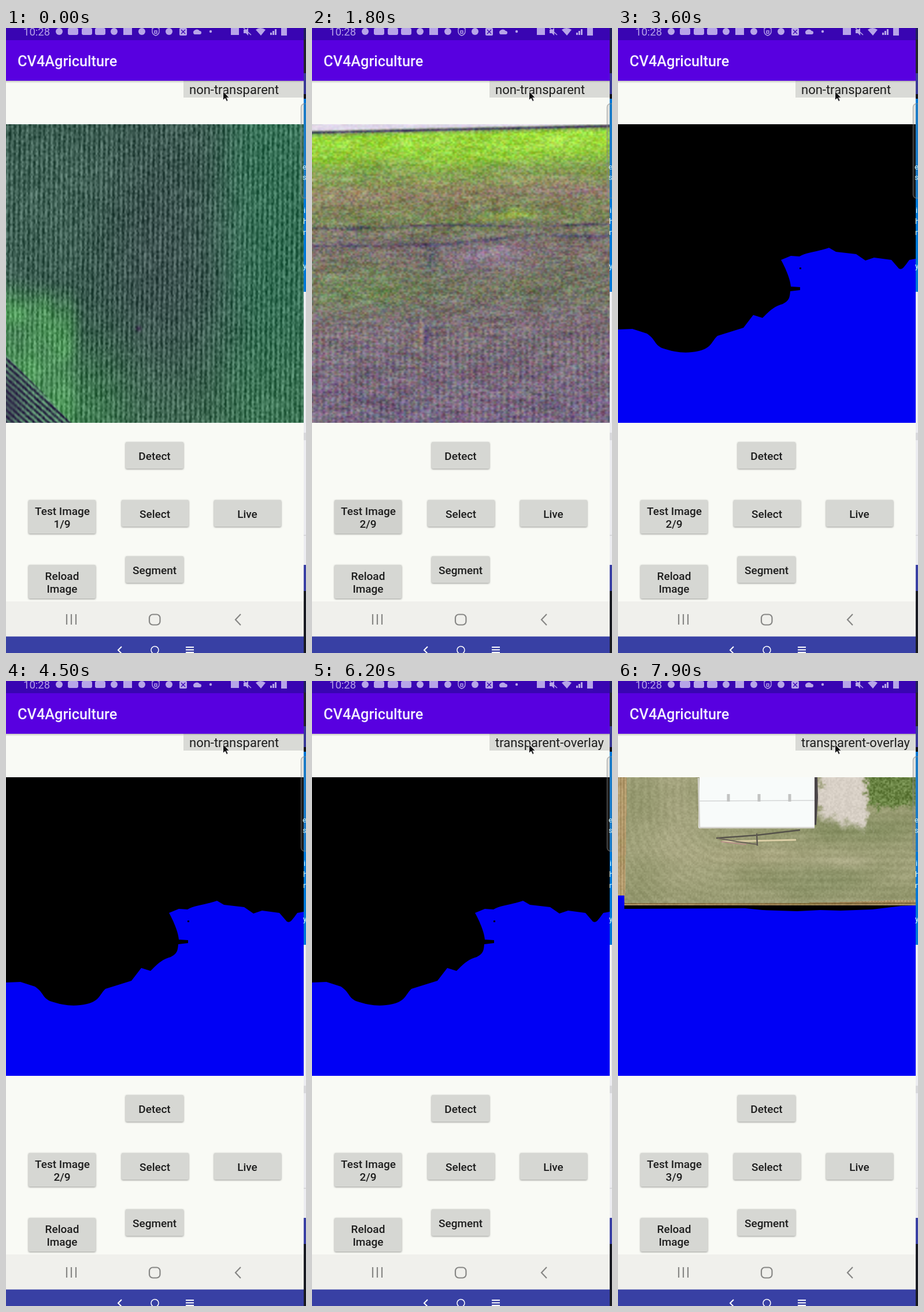
Recreate the animation shown at these times as an HTML page with a canvas. Size 519 px wide and 1078 px high, loop 8 s.

```html
<!DOCTYPE html>
<html lang="en">
<head>
<meta charset="utf-8">
<title>Field segmentation demo</title>
<style>
html, body { margin: 0; width: 519px; height: 1078px; overflow: hidden; background: #f9faf5; }
canvas, svg { position: absolute; left: 0; top: 0; }
canvas { top: 166px; }
text { font-family: Roboto, sans-serif; fill: #1d1d1d; }
.btn text { font-size: 19px; font-weight: 500; text-anchor: middle; }
.btn rect { fill: #d6d7d3; filter: drop-shadow(0 1px 1.5px #0006); }
.spin { font-size: 22px; }
.strip { font-size: 13px; fill: #dff; }
.nav { fill: none; stroke: #878785; stroke-width: 2.2; }
.sysnav { fill: none; stroke: #fff; stroke-width: 2; }

.step { animation: 8s step-end infinite; }
#mask1 { animation-name: mask1; }
#field2 { animation-name: field2; }
#mask2 { animation-name: mask2; }
#field3, .three { animation-name: field3; }
#mask3 { animation-name: mask3; }
.one { animation-name: one; }
.two { animation-name: two; }
.solid { animation-name: solid; }
.overlay { animation-name: overlay; }
@keyframes mask1 { 0% { opacity: 0 } 7.5%, 100% { opacity: 1 } }
@keyframes field2 { 0% { opacity: 0 } 18.75%, 100% { opacity: 1 } }
@keyframes mask2 { 0% { opacity: 0 } 26.25%, 100% { opacity: 1 } }
@keyframes field3 { 0% { opacity: 0 } 82.5%, 100% { opacity: 1 } }
@keyframes mask3 { 0% { opacity: 0 } 91.25%, 100% { opacity: 1 } }
@keyframes one { 0% { opacity: 1 } 18.75%, 100% { opacity: 0 } }
@keyframes two { 0% { opacity: 0 } 18.75% { opacity: 1 } 82.5%, 100% { opacity: 0 } }
@keyframes solid { 0% { opacity: 1 } 66.25%, 100% { opacity: 0 } }
@keyframes overlay { 0% { opacity: 0 } 66.25%, 100% { opacity: 1 } }

#press { opacity: 0; animation: press 8s linear infinite; }
@keyframes press {
  0%, 6.2% { opacity: 0 } 7.5%, 9.5% { opacity: .126 } 14%, 25% { opacity: 0 }
  26.25%, 28% { opacity: .126 } 33%, 89.5% { opacity: 0 }
  91%, 92.5% { opacity: .126 } 97%, 100% { opacity: 0 }
}
#ripple { opacity: 0; animation: ripple 8s linear infinite; }
@keyframes ripple {
  0%, 18% { opacity: 0; r: 30px } 18.75% { opacity: .11; r: 40px } 20% { opacity: .11; r: 110px }
  23.5% { opacity: 0; r: 110px } 23.6%, 82.4% { opacity: 0; r: 30px }
  82.5% { opacity: .11; r: 32px } 83.75% { opacity: .11; r: 40px } 85% { opacity: .09; r: 110px }
  87% { opacity: 0; r: 110px } 100% { opacity: 0; r: 30px }
}
</style>
</head>
<body>
<canvas id="field1" width="515" height="515"></canvas>
<svg id="mask1" class="step" width="519" height="1078">
  <path d="M0 166H515V681H0Z"/>
  <path fill="#750075" d="M0 419C10 418 20 420 29 423L54 436C75 439 92 441 106 453C118 463 123 478 123 500C124 530 127 553 137 571L153 560L167 569C178 574 188 570 190 582C195 595 195 605 200 613C210 635 220 658 222 681H0Z"/>
</svg>
<canvas id="field2" class="step" width="515" height="515"></canvas>
<svg id="mask2" class="step" width="519" height="1078">
  <path d="M0 166H515V681H0Z"/>
  <path fill="#0000f5" d="M0 520L25 519L50 527C66 538 62 545 76 552C100 560 118 562 140 557C162 552 162 540 172 531L217 517L234 495L250 500C262 488 270 480 285 476C297 470 297 464 298 454L315 452V447L299 446C298 430 285 405 282 400L299 393L314 394C325 387 345 386 365 379L377 386L412 390L428 401L443 396L473 400L486 415C492 418 495 412 504 400L515 398V681H0Z"/>
  <path d="M314 413h3v3h-3z"/>
</svg>
<canvas id="field3" class="step" width="515" height="515"></canvas>
<svg id="mask3" class="step" width="519" height="1078">
  <path d="M11 387H515V400H11Z"/>
  <path fill="#0000f5" d="M0 370H11V393L220 392L250 395L310 397L350 395L385 396L440 394L490 388L515 387V681H0Z"/>
</svg>

<svg width="519" height="1078">
  <defs>
    <linearGradient id="shade" x2="0" y2="1">
      <stop stop-opacity=".22"/><stop offset="1" stop-opacity="0"/>
    </linearGradient>
    <clipPath id="testClip"><rect x="39" y="814" width="116" height="58" rx="2"/></clipPath>
  </defs>

  <!-- window behind, at the right edge -->
  <path fill="#20205a" d="M515 0h4v20h-4z"/>
  <path fill="#24242c" d="M515 20h4v58h-4z"/>
  <path fill="#3a3a98" d="M515 78h4v36h-4z"/>
  <path fill="#15151c" d="M515 114h4v8h-4z"/>
  <path fill="#0078d7" d="M515 122h4v333h-4z"/>
  <path fill="#ececf0" d="M515 455h4v471h-4z"/>
  <path fill="#d8d8dc" d="M515 698h4v13h-4zM515 874h4v2h-4z"/>
  <path fill="#3a40a4" d="M515 926h4v45h-4z"/>
  <path fill="#191b22" d="M515 971h4v107h-4z"/>
  <text class="strip" x="513" y="244">e</text><text class="strip" x="513" y="262">s</text>
  <text class="strip" x="515" y="319">i</text><text class="strip" x="514" y="338">h</text>
  <text class="strip" x="514" y="357">n</text><text class="strip" x="514" y="415">y</text>
  <rect x="510.5" y="130.5" width="20" height="163" rx="6" fill="#8883" stroke="#8889" stroke-width="1.4"/>

  <!-- status and title bars -->
  <path fill="#3905b2" d="M0 0h515v21H0z"/>
  <path fill="#5800e0" d="M0 21h515v70H0z"/>
  <path fill="url(#shade)" d="M0 91h515v4H0z"/>
  <g fill="#b7a5e8">
    <text x="30" y="13" font-size="18.5" style="fill:#b7a5e8">10:28</text>
    <circle cx="92" cy="6" r="6"/>
    <rect x="107" y="0" width="18" height="12" rx="3"/>
    <rect x="131" y="0" width="18" height="12" rx="3"/>
    <rect x="154" y="0" width="18" height="12" rx="3"/>
    <circle cx="187" cy="6" r="6"/>
    <rect x="203" y="0" width="15" height="12"/>
    <circle cx="235" cy="6" r="6"/>
    <circle cx="282" cy="6" r="6"/>
    <rect x="300" y="0" width="13" height="13" rx="2"/>
    <path d="M326 11a4 4 0 0 1 0-7a6 6 0 0 1 9 1a3 3 0 0 1 0 6z"/>
    <circle cx="354" cy="6" r="2.2"/>
    <rect x="389" y="0" width="14" height="12"/>
    <path d="M411 3h4l4-3v13l-4-4h-4zM432 3q8-6 17 0l-8 10zM457 8h3v4h-3zM461 5h3v7h-3zM465 2h3v10h-3zM476 0h10v13h-10z"/>
  </g>
  <g fill="none" stroke="#b7a5e8" stroke-width="1.4">
    <path d="M253 1l6-3 6 3v5q0 5-6 7-6-2-6-7zM257 5h4v4h-4z"/>
    <path stroke="#3905b2" d="M303 3l7 7m0-7l-7 7"/>
    <path d="M411 0l13 12"/>
  </g>
  <text x="20" y="65.5" font-size="25.3" font-weight="500" style="fill:#f4efff">CV4Agriculture</text>

  <!-- mode picker -->
  <path fill="#d9dad6" d="M307 91h208v29H307z"/>
  <path fill="url(#shade)" d="M307 91h208v3H307z"/>
  <text class="spin step solid" x="317" y="114">non-transparent</text>
  <text class="spin step overlay" x="317" y="114">transparent-overlay</text>
  <path d="M375.5 109v15.5l3.600-3.200 2.500 5.200 2.600-1.200-2.500-5h4.600z" fill="#111" stroke="#eee"/>

  <!-- buttons -->
  <g class="btn">
    <rect x="207" y="714" width="100" height="46" rx="2"/><text x="257" y="744.5">Detect</text>
    <rect x="200" y="814" width="116" height="46" rx="2"/><text x="257.5" y="844.5">Select</text>
    <rect x="360" y="814" width="116" height="46" rx="2"/><text x="417.5" y="844.5">Live</text>
    <rect x="39" y="926" width="116" height="58" rx="2"/>
    <text x="97" y="951.5">Reload</text><text x="97" y="973.5">Image</text>
    <rect x="207" y="911" width="100" height="46" rx="2"/>
    <path id="press" d="M207 911h100v46H207z"/>
    <text x="257" y="942">Segment</text>
    <rect x="39" y="814" width="116" height="58" rx="2"/>
    <g clip-path="url(#testClip)"><circle id="ripple" cx="100" cy="860" r="30"/></g>
    <text x="97.5" y="839.5">Test Image</text>
    <text class="step one" x="97" y="861.5">1/9</text>
    <text class="step two" x="97" y="861.5">2/9</text>
    <text class="step three" x="97" y="861.5">3/9</text>
  </g>

  <!-- navigation bars -->
  <path fill="#f0f0ec" d="M0 989h515v60H0z"/>
  <g class="nav">
    <path d="M105 1011v18M113 1011v18M121 1011v18M406 1011l-9 9.500 9 9.500"/>
    <rect x="248" y="1011.5" width="18.5" height="18" rx="6"/>
  </g>
  <path fill="#3840a4" d="M0 1049.5h515v29H0z"/>
  <g class="sysnav">
    <path d="M200 1067l-6 6 6 6M311 1068h14M311 1072.5h14M311 1077h14"/>
    <circle cx="257.5" cy="1073" r="6.5" stroke-width="1.5"/>
  </g>
</svg>

<script>
const SIZE = 515;

function rand(x, y) {
  let h = Math.imul(x, 374761393) + Math.imul(y, 668265263) | 0;
  h = Math.imul(h ^ h >>> 13, 1274126177);
  return ((h ^ h >>> 16) >>> 0) / 4294967296;
}

// smooth noise in -1..1
function noise(x, y) {
  const i = Math.floor(x), j = Math.floor(y);
  const u = x - i, v = y - j;
  const a = rand(i, j), b = rand(i + 1, j), c = rand(i, j + 1), d = rand(i + 1, j + 1);
  const top = a + (b - a) * u, low = c + (d - c) * u;
  return 2 * (top + (low - top) * v) - 1;
}

const ramp = (a, b, x) => {
  const t = Math.min(1, Math.max(0, (x - a) / (b - a)));
  return t * t * (3 - 2 * t);
};
const mix = (p, q, t) => p.map((v, i) => v + (q[i] - v) * t);
const add = (p, d) => p.map(v => v + d);
const rows = (v, period) => Math.sin(v * 2 * Math.PI / period);
const spot = (x, y, cx, cy, rx, ry) => Math.exp(-(((x - cx) / rx) ** 2) - ((y - cy) / ry) ** 2);

function paint(id, shade) {
  const ctx = document.getElementById(id).getContext('2d');
  const img = ctx.createImageData(SIZE, SIZE);
  for (let y = 0, k = 0; y < SIZE; y++) {
    for (let x = 0; x < SIZE; x++, k += 4) {
      img.data.set([...shade(x, y), 255], k);
    }
  }
  ctx.putImageData(img, 0, 0);
  return ctx;
}

function cropRows(x, y) {
  const grain = noise(x / 2.6, y / 3.6);
  const broad = noise(x / 50, y / 70);
  let c = mix([62, 96, 84], [56, 114, 88], ramp(320, 440, x + 15 * broad));
  c = mix(c, [62, 116, 80], .55 * ramp(280, 515, y));
  c = mix(c, [62, 78, 80], .65 * spot(x, y, 265, 230, 100, 250));
  c = mix(c, [76, 148, 92], .55 * spot(x, y, 130, 500, 80, 110));
  const edge = 255 + x * .3 + 25 * broad;
  const patch = ramp(edge, edge + 80, y) * (1 - ramp(94, 130, x + 10 * broad));
  c = mix(c, [86, 162, 96], patch * (.75 + .25 * noise(x / 22, y / 30)));
  c = mix(c, [50, 42, 68], spot(x, y, 229, 352, 5, 5));
  const corner = y - 394 - x * 1.04;
  const band = .5 + .5 * rows(y - x * .9, 11) + .3 * grain;
  let far = mix([40, 42, 66], [98, 150, 118], band);
  far = mix(far, [50, 38, 75], .6 * spot(x, y, 0, 480, 30, 50));
  c = add(c, 21 * rows(x + y * .012, 8.6) + 27 * grain + 6 * broad);
  return mix(c, far, ramp(0, 8, corner));
}

const bands = [
  [0, [232, 224, 240]], [9, [220, 212, 230]], [15, [132, 165, 90]], [24, [158, 222, 62]],
  [58, [152, 208, 66]], [84, [134, 164, 82]], [118, [146, 134, 104]], [165, [122, 134, 88]],
  [215, [126, 114, 112]], [290, [116, 120, 98]], [345, [124, 112, 118]], [540, [116, 100, 128]]
];

function hillside(x, y) {
  const streak = noise(x / 32, y / 5);
  const warp = 9 * noise(x / 70, y / 25) + 4 * streak;
  const h = Math.max(0, y + x * .022 + warp * ramp(12, 40, y));
  const n = Math.max(1, bands.findIndex(b => b[0] >= h));
  const [p, q] = [bands[n - 1], bands[n]];
  let c = mix(p[1], q[1], (h - p[0]) / (q[0] - p[0]));
  c = mix(c, [166, 204, 72], .7 * spot(x, y + warp, 350, 161, 50, 7));
  c = mix(c, [114, 144, 84], .6 * spot(x, y, 90, 280, 85, 38));
  c = mix(c, [146, 122, 160], .6 * spot(x, y, 300, 228, 75, 24));
  c = mix(c, [146, 124, 140], .5 * spot(x, y, 470, 115, 90, 10));
  c = mix(c, [70, 74, 92], .5 * spot(x, y, 205, 230, 12, 30));
  c = mix(c, [178, 140, 112], .7 * spot(x, y, 187, 365, 5, 20));
  c = mix(c, [78, 72, 124], .6 * spot(x, y, 197, 365, 4, 22));
  const line = (at, w) => Math.exp(-(((y - at) / w) ** 2));
  const low = 208 - 16 * ramp(190, 400, x) + warp * .2;
  const fade = .45 + .25 * noise(x / 40, 3);
  const dark = Math.max(.8 * line(14 - x * .022, 2.5), fade * line(179 - x * .014 + warp * .3, 3),
    fade * line(low, 4));
  c = mix(c, [64, 58, 98], dark);
  const calm = .3 + .7 * ramp(6, 18, h);
  const furrow = ramp(325, 380, y) * 9 * rows(x, 11);
  const light = calm * (20 * noise(x / 3.4, y / 2.8) + 12 * streak) + 8 * noise(x / 28, y / 12) + furrow;
  return c.map((v, i) => v + light + calm * 20 * noise(x / 4 + 200 * i, y / 3.5));
}

function farmyard(x, y) {
  const grain = noise(x / 2.5, y / 2.5), broad = noise(x / 45, y / 25);
  const soilTop = 216 - ramp(330, 515, x) * 5;
  if (y > soilTop || x < 15 - y * .015) {
    let c = mix([177, 152, 106], [186, 156, 124], ramp(448, 460, y));
    c = mix(c, [156, 156, 88], .3 * Math.max(0, noise(x / 30 + 7, y / 14)));
    const lines = y < 215 ? rows(x, 5.5) * 13 : y > 455 ? rows(x, 7) * 7 : rows(y + x * .012, 5.2) * 6;
    return add(c, lines + 9 * grain + 5 * broad - 45 * spot(0, y, 0, 217, 1, 2));
  }
  let c = mix([162, 163, 124], [144, 148, 106], .5 + .5 * broad);
  c = mix(c, [178, 174, 140], .5 * spot(x, y, 100, 60, 38, 130));
  c = mix(c, [186, 178, 142], .5 * spot(x, y, 240, 135, 120, 18));
  c = mix(c, [112, 128, 78], .5 * spot(x, y, 420, 90, 110, 25));
  c = mix(c, [122, 136, 92], .4 * spot(x, y, 350, 180, 90, 30));
  c = mix(c, [194, 188, 156], .5 * spot(x, y, 390, 145, 60, 10));
  const wobble = 9 * noise(x / 9, y / 9) + 5 * noise(x / 3, y / 3);
  const gravel = ramp(340, 354, x + wobble) * (1 - ramp(420, 436, x + wobble)) *
    (1 - ramp(56, 84, y - (x - 350) * .22 + wobble));
  c = mix(c, [216, 208, 198], gravel);
  const bush = ramp(426, 436, x + wobble) * (1 - ramp(42, 58, y + wobble));
  c = mix(c, [104, 130, 66], bush);
  // mowing tracks bend around the building
  const ring = Math.hypot(Math.min(0, x - 190), Math.max(0, y - 55));
  return add(c, grain * (10 + 20 * bush) + 4 * rows(ring, 14) * (1 - gravel) * (1 - bush));
}

function drawYard(ctx) {
  const stroke = (color, width, ...pts) => {
    ctx.strokeStyle = color;
    ctx.lineWidth = width;
    ctx.beginPath();
    pts.forEach(p => ctx.lineTo(...p));
    ctx.stroke();
  };
  stroke('#4a4548', 6, [342, 0], [343, 35], [340, 82]);
  ctx.fillStyle = '#f8fbfa';
  ctx.beginPath();
  [[141, 0], [340, 0], [340, 86], [139, 87]].forEach(p => ctx.lineTo(...p));
  ctx.fill();
  stroke('#d5d3cd', 2.5, [139, 1], [141, 87], [340, 87]);
  stroke('#d4d6d6', 1.5, [141, 41], [340, 40]);
  for (const x of [191, 244, 297]) stroke('#c2c3c2', 5, [x, 29], [x, 42]);
  stroke('#dccfa6', 3, [180, 111], [308, 108]);
  stroke('#55524a', 2.5, [170, 105], [240, 100], [315, 91]);
  stroke('#6a6258', 2, [172, 105], [206, 111], [242, 116]);
  stroke('#5d5850', 2.5, [240, 97], [241, 118]);
  stroke('#b58f88', 2, [178, 111], [222, 116]);
  for (const [x, y, w] of [[50, 307, 60], [45, 319, 65], [135, 384, 45], [160, 374, 60], [330, 385, 45], [345, 372, 30]]) {
    stroke('#d6c79a90', 2, [x, y], [x + w, y + 1]);
    stroke('#8a804f70', 2, [x, y + 2.5], [x + w, y + 3.5]);
  }
}

paint('field1', cropRows);
paint('field2', hillside);
drawYard(paint('field3', farmyard));
</script>
</body>
</html>
```
